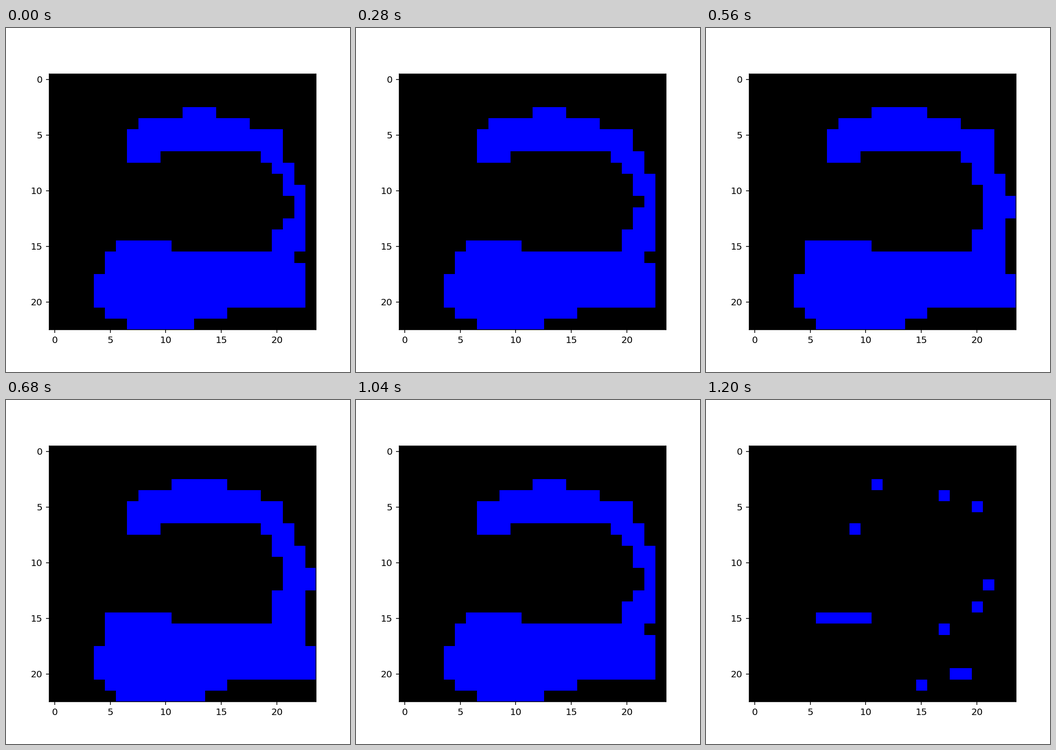
Recreate the animation shown at these times as a matplotlib script. Size 748 by 748 pixels, loop 1.24 s.

```python
import math

import matplotlib.pyplot as plt
import numpy as np
from matplotlib.animation import FuncAnimation
from matplotlib.path import Path

SIZE, DPI = 748, 144
ROWS, COLS = 23, 24
FRAMES, INTERVAL = 31, 40
LEFT, TOP, CELL = 93.6, 99.9, 24.18  # plot corner and cell size in pixels

# Key points of the shape in cell units: its outside, then its hollow
OUTER = np.array([
    (6.6, 7.4), (6.6, 4.4), (12.6, 2.6), (13.4, 2.6), (20.6, 4.9),
    (20.6, 6.2), (22.05, 8.95), (22.7, 11.5), (22.1, 15.4), (21.7, 16),
    (22.1, 16.7), (22.6, 17.7), (22.6, 20.4), (15.5, 20.6), (15.2, 21.2),
    (11.8, 22.2), (6.6, 22.3), (3.8, 20.1), (3.95, 17.9), (5.4, 14.6),
    (10.4, 14.6),
])
INNER = np.array([
    (10.4, 15.5), (19.9, 15.5), (19.9, 13.6), (20.9, 12.4), (21.1, 11),
    (20.3, 9.05), (19.5, 8), (17.6, 6.5), (9.4, 6.5), (9.4, 7.4),
])
CENTRE = np.array([13, 7.2])
GROW = np.array([0.05, 0.026])
SHRINK = np.array([-0.05, 0])

# Loose cells (column, row) of the closing slice
CAP = [(11, 3), (17, 4), (20, 5), (9, 7), (21, 12), (20, 14),
       (17, 16), (18, 20), (19, 20), (15, 21)]

cells = np.stack(np.meshgrid(np.arange(COLS), np.arange(ROWS)), -1)


def stretch(points, amount):
    return points + (points - CENTRE) * amount


def body(n):
    """Cells inside the outline, which thickens halfway through the stack."""
    swell = np.clip(0.25 + 1.4 * math.cos(math.tau * (n / 32 - 0.5)), 0, 1)
    outline = np.vstack([stretch(OUTER, swell * GROW),
                         stretch(INNER, swell * SHRINK)])
    outline += np.random.default_rng(n).normal(0, 0.03, outline.shape)
    inside = Path(outline).contains_points(cells.reshape(-1, 2))
    return inside.reshape(ROWS, COLS)


def cap():
    grid = np.zeros((ROWS, COLS), bool)
    for col, row in CAP:
        grid[row, col] = True
    grid[15, 6:11] = True
    return grid


def slice_image(n):
    image = np.zeros((ROWS, COLS, 3), np.uint8)
    image[cap() if n == FRAMES - 1 else body(n), 2] = 255
    return image


fig = plt.figure(figsize=(SIZE / DPI, SIZE / DPI), dpi=DPI)
width, height = COLS * CELL, ROWS * CELL
ax = fig.add_axes([LEFT / SIZE, 1 - (TOP + height) / SIZE,
                   width / SIZE, height / SIZE])
picture = ax.imshow(slice_image(0), interpolation="nearest")


def update(n):
    picture.set_data(slice_image(n))
    return [picture]


anim = FuncAnimation(fig, update, frames=FRAMES, interval=INTERVAL,
                     repeat=True, repeat_delay=0)
plt.show()
```
